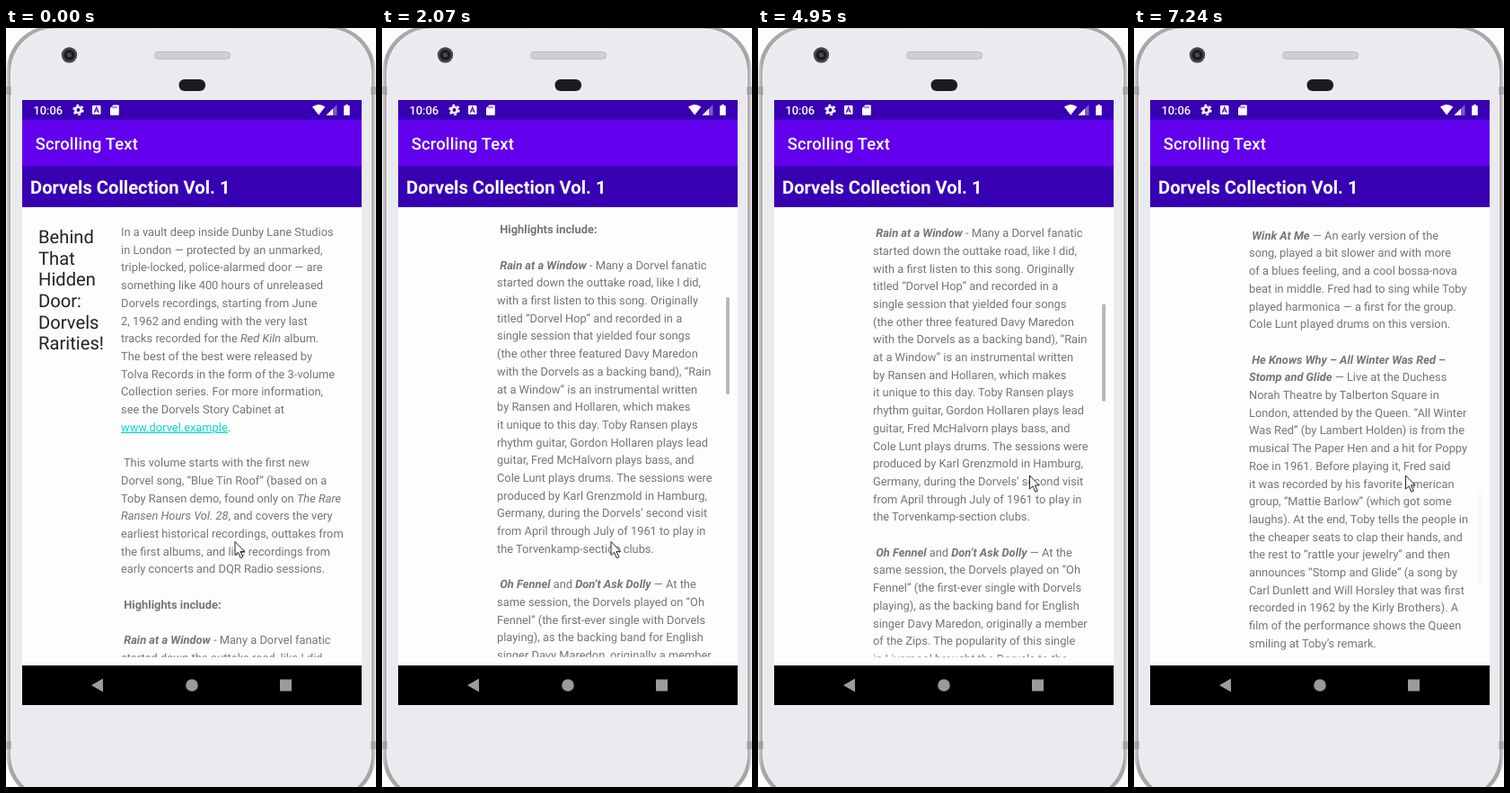
These frames come from a looping animation (412 px wide and 843 px high, 8000 ms). An HTML page:

```html
<!DOCTYPE html>
<html lang="en">
<head>
<meta charset="utf-8">
<title>Scrolling Text</title>
<style>
  html, body { margin: 0; width: 100%; height: 100%; overflow: hidden; background: #fdfdfd; }
  svg { display: block; width: 100%; height: 100%; }
  text { font-family: Roboto, sans-serif; white-space: pre; text-rendering: geometricPrecision; }
  #body text { font-size: 12.86px; fill: #757575; }
  #side text { font-size: 20.2px; fill: #222; }
  .i { font-style: italic; }
  .b { font-weight: 700; }
  #body .a { fill: #03dac5; text-decoration: underline; }
</style>
</head>
<body>
<svg viewBox="0 0 412 843">
  <defs>
    <clipPath id="view"><rect x="18" y="208.2" width="378" height="490.6"/></clipPath>
    <linearGradient id="edge">
      <stop offset="0" stop-color="#d9d6d9"/>
      <stop offset=".01" stop-color="#aaa3a8"/>
      <stop offset=".5" stop-color="#c4c0c4"/>
      <stop offset=".99" stop-color="#aaa3a8"/>
      <stop offset="1" stop-color="#d9d6d9"/>
    </linearGradient>
  </defs>

  <!-- phone -->
  <rect width="412" height="843" fill="#fdfdfd"/>
  <rect x=".5" y="-3" width="411" height="862" rx="52" fill="url(#edge)"/>
  <rect x="5.5" y="1" width="401" height="854" rx="48" fill="#e9ebee" stroke="#f6f7f8"/>
  <path d="M0 65h6v9h-6zM406 65h6v9h-6zM0 792h6v9h-6zM406 792h6v9h-6z" fill="#8f898e" opacity=".5"/>
  <circle cx="70.5" cy="30" r="8.7" fill="#47474b"/>
  <circle cx="70.5" cy="30" r="6" fill="#1d1d21"/>
  <circle cx="70.5" cy="30" r="2.5" fill="#4b4d5c"/>
  <rect x="165.500" y="26.500" width="84" height="8" rx="4" fill="#cdcfd3" stroke="#b9bbc0"/>
  <rect x="192.500" y="57" width="29.500" height="13" rx="6.200" fill="#1c1c1e"/>

  <!-- screen -->
  <rect x="18" y="80" width="378" height="672" fill="#fdfdfd"/>
  <rect x="18" y="80" width="378" height="119" fill="#3700b3"/>
  <rect x="18" y="102" width="378" height="51.500" fill="#6200ee"/>
  <g fill="#fff">
    <text x="30.500" y="96" font-size="12.86" font-weight="500">10:06</text>
    <text x="32.700" y="135" font-size="18.37" font-weight="500" letter-spacing=".2">Scrolling Text</text>
    <text x="27" y="184" font-size="20.2" font-weight="700">Dorvels Collection Vol. 1</text>
    <circle cx="80.500" cy="91" r="3.300" fill="none" stroke="#fff" stroke-width="2.600"/>
    <circle cx="80.500" cy="91" r="5.300" fill="none" stroke="#fff" stroke-width="1.800" stroke-dasharray="2.775"/>
    <rect x="96" y="86" width="9.500" height="10" rx="1.200"/>
    <path d="M119.500 85.500h5.300q1 0 1 1v9.500q0 1-1 1h-7.800q-1 0-1-1v-7z"/>
    <path d="M341 87.500q7.200-5 14.400 0l-7.200 9.300z"/>
    <path d="M368.500 85v12h-12z" opacity=".35"/>
    <path d="M364 89.500v7.500h-7.500z"/>
    <path d="M378 85h3v1.200h1.800v10.800h-6.600v-10.800h1.800z"/>
  </g>
  <path d="M98.300 94l2.450-6 2.450 6M99.200 92h3.100" fill="none" stroke="#3700b3" stroke-width="1.100"/>
  <path d="M119 87v2.200M121 87v2.200M123 87v2.200" stroke="#3700b3" stroke-width=".9"/>

  <g clip-path="url(#view)">
    <g id="page"><g id="side"></g><g id="body"></g></g>
    <rect id="bar" x="383.200" width="3.700" height="107.500" fill="#b4b4b4"/>
  </g>

  <rect x="18" y="708" width="378" height="44" fill="#000"/>
  <g fill="#9b9b9b">
    <path d="M95 730l13-7.500v15z"/>
    <circle cx="207" cy="730" r="6.800"/>
    <rect x="305" y="723.500" width="13" height="13"/>
  </g>

  <path id="cursor" d="M.5.5V15.500L4 12.300L6.800 18.700L9.300 17.600L6.500 11.400H11.200Z" fill="#fff" stroke="#222" stroke-linejoin="round"/>
</svg>
<script>
const SIDE = `Behind
That
Hidden
Door:
Dorvels
Rarities!`;

// * italic, _ bold, ~ link
const BODY = `In a vault deep inside Dunby Lane Studios
in London — protected by an unmarked,
triple-locked, police-alarmed door — are
something like 400 hours of unreleased
Dorvels recordings, starting from June
2, 1962 and ending with the very last
tracks recorded for the *Red Kiln* album.
The best of the best were released by
Tolva Records in the form of the 3-volume
Collection series. For more information,
see the Dorvels Story Cabinet at
~www.dorvel.example~.

 This volume starts with the first new
Dorvel song, “Blue Tin Roof” (based on a
Toby Ransen demo, found only on *The Rare*
*Ransen Hours Vol. 28*, and covers the very
earliest historical recordings, outtakes from
the first albums, and live recordings from
early concerts and DQR Radio sessions.

 _Highlights include:_

 _*Rain at a Window*_ - Many a Dorvel fanatic
started down the outtake road, like I did,
with a first listen to this song. Originally
titled “Dorvel Hop” and recorded in a
single session that yielded four songs
(the other three featured Davy Maredon
with the Dorvels as a backing band), “Rain
at a Window” is an instrumental written
by Ransen and Hollaren, which makes
it unique to this day. Toby Ransen plays
rhythm guitar, Gordon Hollaren plays lead
guitar, Fred McHalvorn plays bass, and
Cole Lunt plays drums. The sessions were
produced by Karl Grenzmold in Hamburg,
Germany, during the Dorvels’ second visit
from April through July of 1961 to play in
the Torvenkamp-section clubs.

 _*Oh Fennel*_ and _*Don’t Ask Dolly*_ — At the
same session, the Dorvels played on “Oh
Fennel” (the first-ever single with Dorvels
playing), as the backing band for English
singer Davy Maredon, originally a member
of the Zips. The popularity of this single
in Liverpool brought the Dorvels to the
attention of Alvin Corstin, who worked in
the DAMS record store and tried to meet
demand for the disc. Toby Ransen then
sings a fine “Don’t Ask Dolly” (his first-ever
released vocal).

 _*Gatherin*_ — A Barry Folter - Glen Vadner
comedy song that was a hit for the
Cobblers in 1957, and a popular live
favorite of the Dorvels. The Cobblers also
had a hit with “Camino Manso” and the
Dorvels covered that song as well. Rusty
Penn had by now replaced Cole Lunt on
drums. The high falsetto is Gordon, who
also plays a hesitant lead guitar. This is
from their first audition for Novda Records,
taped on a winter day in a cold little
room in London. The label turned them
down, saying that guitar groups would
soon be out of style. The tape survived
and remains a favorite of collectors
all over the world.

 _*Wink At Me*_ — An early version of the
song, played a bit slower and with more
of a blues feeling, and a cool bossa-nova
beat in middle. Fred had to sing while Toby
played harmonica — a first for the group.
Cole Lunt played drums on this version.

 _*He Knows Why – All Winter Was Red –*_
_*Stomp and Glide*_ — Live at the Duchess
Norah Theatre by Talberton Square in
London, attended by the Queen. “All Winter
Was Red” (by Lambert Holden) is from the
musical The Paper Hen and a hit for Poppy
Roe in 1961. Before playing it, Fred said
it was recorded by his favorite American
group, “Mattie Barlow” (which got some
laughs). At the end, Toby tells the people in
the cheaper seats to clap their hands, and
the rest to “rattle your jewelry” and then
announces “Stomp and Glide” (a song by
Carl Dunlett and Will Horsley that was first
recorded in 1962 by the Kirly Brothers). A
film of the performance shows the Queen
smiling at Toby’s remark.`;

const LOOP = 8000;
const $ = id => document.getElementById(id);
const MARKS = { '*': 'i', '_': 'b', '~': 'a' };

function styled(line) {
  const on = new Set();
  return line.split(/([*_~])/).map(part => {
    const mark = MARKS[part];
    if (!mark) return part && `<tspan class="${[...on].join(' ')}">${part}</tspan>`;
    if (!on.delete(mark)) on.add(mark);
    return '';
  }).join('');
}

function lay(id, text, x, y, pitch) {
  $(id).innerHTML = text.split('\n').map((line, i) =>
    `<text x="${x}" y="${(y + i * pitch).toFixed(2)}">${styled(line)}</text>`).join('');
}

lay('side', SIDE, 36, 239, 23.68);
lay('body', BODY, 128, 231, 19.7);

// the screen refreshes only at these moments: [first, last, count]
const TICKS = [
  [0, 0, 1], [500, 500, 1], [920, 1040, 2], [1310, 1680, 4], [1830, 2550, 7],
  [2670, 2970, 3], [3120, 3240, 2], [4200, 4680, 5], [4830, 4950, 2],
  [5200, 5560, 4], [5710, 5710, 1], [5850, 5970, 2], [6500, 6620, 2], [7120, 7240, 2]
].flatMap(([a, b, n]) => Array.from({ length: n }, (_, i) => n > 1 ? a + (b - a) * i / (n - 1) : a));

// [time, value] keys
const SCROLL = [
  [800, 0], [1040, 58], [1190, 58], [1680, 220.5], [2070, 416.5], [4200, 416.5],
  [4320, 375], [4440, 321.5], [4680, 405], [4830, 438], [4950, 452], [5080, 452],
  [5710, 768], [5850, 910], [5970, 1055], [6380, 1055], [6500, 1213], [6620, 1395]
];
const BAR = [[380, 0], [500, 1], [2430, 1], [2670, 0], [4200, 0], [4320, 1], [7000, 1], [7240, .06]];
const CX = [
  [2190, 254.5], [2310, 112], [2430, 381], [2550, 371], [2670, 378], [2820, 388],
  [2970, 389], [3120, 384], [3240, 385], [4080, 385], [4320, 302]
];
const CY = [[2190, 570], [2430, 380], [2550, 358], [2970, 358], [3120, 356], [3240, 356.5], [4080, 356.5], [4320, 496.5]];

function at(keys, t) {
  const i = keys.findIndex(k => k[0] >= t);
  if (i < 0) return keys[keys.length - 1][1];
  if (i === 0) return keys[0][1];
  const [t0, v0] = keys[i - 1], [t1, v1] = keys[i];
  return v0 + (v1 - v0) * (t - t0) / (t1 - t0);
}

function draw(time) {
  const t = TICKS.filter(k => k <= time + .5).pop();
  const scroll = at(SCROLL, t);
  $('page').setAttribute('transform', `translate(0 ${-scroll})`);
  $('bar').setAttribute('y', 208.2 + scroll * .2185);
  $('bar').setAttribute('opacity', at(BAR, t));
  $('cursor').setAttribute('transform', `translate(${at(CX, t)} ${at(CY, t)})`);
}

const start = performance.now();
function loop() {
  draw((performance.now() - start) % LOOP);
  requestAnimationFrame(loop);
}
loop();
</script>
</body>
</html>
```
